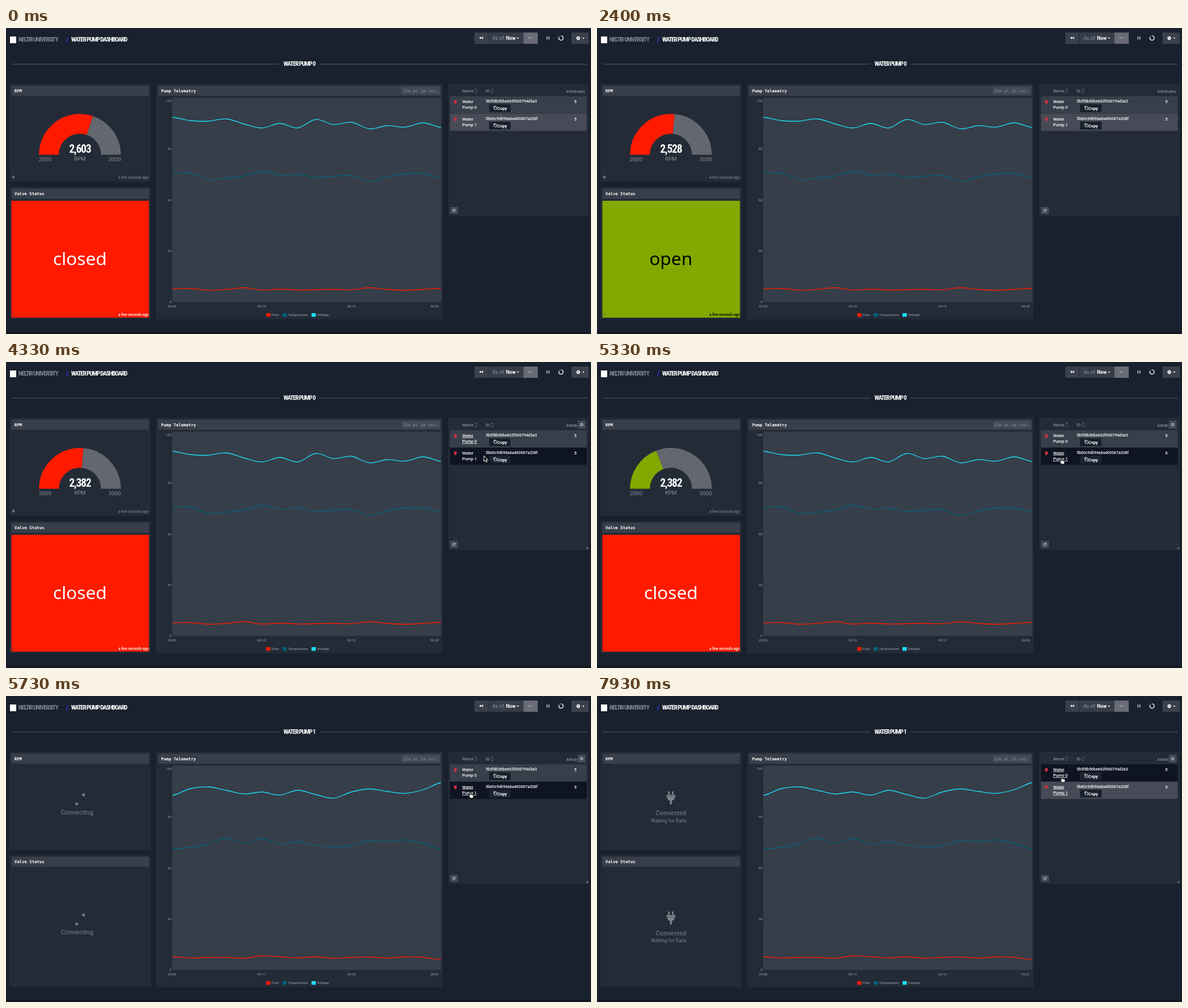
An HTML page with a canvas for the animation above (8000 ms loop, 1033 by 542 pixels).

```html
<!DOCTYPE html>
<html lang="en">
<head>
<meta charset="utf-8">
<title>Water pump dashboard</title>
<style>
  html, body { margin: 0; width: 100%; height: 100%; overflow: hidden; background: #19212e; }
  canvas { display: block; }
</style>
</head>
<body>
<canvas id="stage" width="1033" height="542"></canvas>
<script>
const ctx = document.getElementById('stage').getContext('2d');
const LOOP = 8000;
const SANS = 'Roboto, "Open Sans", sans-serif';
const TITLE = '"Roboto Condensed", Roboto, sans-serif';
const MONO = '"DejaVu Sans Mono", monospace';
const RED = '#ff1a00', GREEN = '#82a900', TEAL = '#056079', CYAN = '#1cdcf8';
const PANEL = '#232b37', HEADER = '#383f4a', GREY = '#8b9098';

// Moments at which the state changes
const FIRST_UPDATE = 1130, SECOND_UPDATE = 4330, CLICK = 5330, SWITCH = 5730, CONNECTED = 6600;

// Sixteen samples per series, as heights on the plot
const SERIES = [
  [[CYAN, [158, 164, 165, 161, 170, 177, 169, 177, 162, 171, 167, 178.5, 173, 175.5, 168, 176]],
   [TEAL, [257, 257, 268, 266, 262, 254, 260.5, 259, 264.5, 262.5, 261.5, 272, 263.5, 258.5, 258, 265]],
   [RED, [462, 461.5, 464.5, 463, 460, 464, 462.5, 464, 463.5, 463, 463.5, 460, 463, 464.5, 463, 461]]],
  [[CYAN, [176, 164, 161, 167, 173.5, 170, 175.5, 167, 174.5, 181, 170, 164.5, 169, 172.5, 166, 153.5]],
   [TEAL, [271, 268, 262, 251.5, 261, 252.5, 262, 258, 264, 267.5, 265, 256.5, 258, 255, 261, 271]],
   [RED, [462, 464, 463, 463, 464.5, 460.5, 462, 464, 462, 464.5, 463, 462.5, 464, 462, 463, 467]]]
];

// Pointer path: time, x, y
const PATH = [[3330, 948, 30], [3600, 931, 44], [3950, 882, 118], [4330, 844, 166],
              [4800, 820, 170], [6200, 820, 170], [6750, 821, 142], [8000, 821, 142]];

const ARROW = new Path2D('M0 0V10L2.3 8L3.9 11.6L5.6 10.9L4 7.4H7Z');
const HAND = new Path2D('M-1 1Q0-.7 1 1V4.5L5 5.4Q6 5.8 5.8 7L5 11H0L-3 7Q-3.6 5.6-2.3 5.9L-1 7Z');
const GRAB = new Path2D('M-2.5 3L-4.6.6Q-5.2-.9-3.7-.6L-2.6.3L-3.2-2.8Q-2.6-4.2-1.6-3L-1.2-4Q-.3-5 .4-3.8Q1.5-4.6 2-3Q3.2-3.6 3.6-2.2L3.3 3L2.5 5H-1.5Z');

const clamp = v => Math.max(0, Math.min(1, v));
const easeOut = v => 1 - (1 - clamp(v)) ** 3;
const mix = (a, b, k) => a + (b - a) * k;

function rect(x1, y1, x2, y2, color) {
  ctx.fillStyle = color;
  ctx.fillRect(x1, y1, x2 - x1, y2 - y1);
}

function poly(color, ...p) {
  ctx.fillStyle = color;
  ctx.beginPath();
  for (let i = 0; i < p.length; i += 2) ctx.lineTo(p[i], p[i + 1]);
  ctx.fill();
}

// y is the middle of the capitals
function text(str, x, y, size, color, { align = 'left', weight = 400, family = SANS, spacing = 0, underline } = {}) {
  ctx.font = `${weight} ${size}px ${family}`;
  ctx.letterSpacing = spacing + 'px';
  ctx.textAlign = align;
  ctx.fillStyle = color;
  ctx.fillText(str, x, y + size * 0.36);
  if (underline) ctx.fillRect(x, y + size * 0.36 + 1, ctx.measureText(str).width, 0.8);
}

const title = (str, x, y, color, size = 11, align = 'left') =>
  text(str, x, y, size, color, { align, weight: 700, family: TITLE, spacing: -1.1 });

function gear(x, y, r, color) {
  ctx.strokeStyle = color;
  ctx.lineWidth = r * 0.55;
  ctx.beginPath();
  ctx.arc(x, y, r * 0.62, 0, 7);
  ctx.stroke();
  for (let i = 0; i < 8; i++) {
    const a = i * Math.PI / 4, c = Math.cos(a), s = Math.sin(a);
    ctx.beginPath();
    ctx.moveTo(x + c * r * 0.7, y + s * r * 0.7);
    ctx.lineTo(x + c * r * 1.1, y + s * r * 1.1);
    ctx.stroke();
  }
}

function plug(x, y, scale, color) {
  ctx.save();
  ctx.translate(x, y);
  ctx.scale(scale, scale);
  rect(-4.8, -12, -2, -6, color);
  rect(2, -12, 4.8, -6, color);
  rect(-8, -5.5, 8, -2.5, color);
  ctx.beginPath();
  ctx.arc(0, -2, 6.8, 0, Math.PI);
  ctx.fill();
  rect(-1.6, 4, 1.6, 11, color);
  ctx.restore();
}

function handle(x, y) {
  rect(x - 4, y - 1, x, y, GREY);
  rect(x - 1, y - 4, x, y, GREY);
}

function gearBox(x, y) {
  rect(x - 7, y - 7, x + 7, y + 7, '#434a56');
  gear(x, y, 2.8, '#9da1a8');
}

function panel(x1, y1, x2, y2, name) {
  rect(x1, y1, x2, y2, PANEL);
  if (!name) return;
  rect(x1 + 3.5, 102, x2 - 3, 120, HEADER);
}

function widget(x1, y1, x2, y2, name) {
  rect(x1, y1, x2, y2, PANEL);
  rect(x1 + 3.5, y1 + 3, x2 - 3, y1 + 21, HEADER);
  text(name, x1 + 9, y1 + 12, 7.3, '#fff', { weight: 700, family: MONO });
}

function toolbar() {
  rect(7, 15, 18, 27, '#fff');
  title('NELTIR UNIVERSITY', 22, 20.5, '#80858f');
  title('/', 106, 20.5, '#2b3cf0', 13);
  title('WATER PUMP DASHBOARD', 115, 20.5, '#fff');

  rect(827, 8, 851, 28, '#3a414c');
  rect(851.5, 8, 913, 28, '#363d48');
  rect(913.5, 8, 939, 28, '#696b77');
  rect(998.5, 8, 1029, 28, '#3a414c');
  for (const x of [835.5, 839]) poly('#fff', x, 17.5, x + 3.3, 15.2, x + 3.3, 19.8);
  for (const x of [923, 926.5]) poly('#9496a0', x, 15.2, x + 3.3, 17.5, x, 19.8);
  text('As of:', 859, 17.5, 8.5, '#959aa2');
  text('Now', 883, 17.5, 8.5, '#fff', { weight: 700 });
  poly('#fff', 902, 17, 906, 17, 904, 19.3);
  rect(954.3, 15, 956.2, 20.5, '#a2a6ad');
  rect(957.7, 15, 959.6, 20.5, '#a2a6ad');
  ctx.lineWidth = 1.3;
  for (const [color, from, to] of [['#555c67', 0, 7], ['#fff', -1.5, 3.6]]) {
    ctx.strokeStyle = color;
    ctx.beginPath();
    ctx.arc(980, 17.7, 3.9, from, to);
    ctx.stroke();
  }
  gear(1010.5, 18, 3, '#fff');
  poly('#fff', 1017.5, 17, 1021.5, 17, 1019.5, 19.3);
}

function heading(pump, hover) {
  if (hover) {
    rect(6, 38, 1029, 55.5, '#363d48');
    gearBox(1020, 47);
    handle(1028, 88.5);
  }
  rect(10, 63.5, 482, 64.5, '#555c66');
  rect(554, 63.5, 1026, 64.5, '#555c66');
  title('WATER PUMP ' + pump, 518, 63.5, '#fff', 11, 'center');
}

function gaugeWidget(t) {
  const value = t < FIRST_UPDATE ? '2,603' : t < SECOND_UPDATE ? '2,528' : '2,382';
  let level = mix(0.603, 0.528, easeOut((t - FIRST_UPDATE) / 800));
  level = mix(level, 0.382, easeOut((t - SECOND_UPDATE) / 800));
  const split = Math.PI * (1 + level);
  ctx.lineWidth = 35;
  for (const [color, from, to] of [['#64676f', split, Math.PI * 2], [level < 0.5 ? GREEN : RED, Math.PI, split]]) {
    ctx.strokeStyle = color;
    ctx.beginPath();
    ctx.arc(130.5, 224.5, 54.7, from, to);
    ctx.stroke();
  }
  text(value, 130.5, 214, 19.5, '#fff', { align: 'center', weight: 700, family: TITLE, spacing: -1.2 });
  text('RPM', 130.5, 232, 9.6, GREY, { align: 'center' });
  text('2000', 58, 232, 9.9, GREY);
  text('3000', 203, 232, 9.9, GREY, { align: 'right' });
  if (t < CLICK) plug(13, 264.5, 0.28, GREY);
  text('a few seconds ago', 252, 264.5, 6.4, GREY, { align: 'right' });
}

function valveWidget(t) {
  const open = t >= FIRST_UPDATE && t < SECOND_UPDATE;
  const ink = open ? '#000' : '#fff';
  rect(9.5, 306, 252.5, 513, open ? GREEN : RED);
  text(open ? 'open' : 'closed', 130.5, 409, 31.7, ink, { align: 'center', family: '"Noto Sans", sans-serif' });
  if (t < CLICK) plug(13, 507.5, 0.28, open ? '#6d901c' : '#a33a2c');
  text('a few seconds ago', 252, 507.5, 6.4, ink, { align: 'right', weight: 500 });
}

// Two cubes wander around a square, shrinking and growing between its corners
function loader(cx, cy, t) {
  for (const shift of [0.22, 0.72]) {
    const e = ((t - SWITCH) / 1800 + shift) % 1 * 4, side = Math.floor(e), k = e - side;
    const half = side % 2 ? mix(2, 4, k) : mix(4, 2, k);
    ctx.save();
    ctx.translate(cx, cy);
    ctx.rotate(side * Math.PI / 2);
    ctx.translate(mix(-8, 8, k), -8);
    ctx.rotate(-e * Math.PI);
    rect(-half, -half, half, half, '#797e87');
    ctx.restore();
  }
}

function waiting(cy, t) {
  const dots = '.'.repeat(Math.floor((t - SWITCH) / 400) % 4);
  if (t < CONNECTED) {
    loader(131, cy, t);
    text('Connecting ' + dots, 97, cy + 22.5, 11.3, '#7e838c');
  } else {
    plug(130.5, cy - 2, 1, '#7e838c');
    text('Connected', 130.5, cy + 24, 11.3, '#7e838c', { align: 'center' });
    text('Waiting for Data ' + dots, 95, cy + 37.5, 8.7, '#7e838c');
  }
}

function curve(points, color) {
  const step = 474 / 15, at = i => points[Math.max(0, Math.min(15, i))];
  ctx.strokeStyle = color;
  ctx.lineWidth = 1.3;
  ctx.beginPath();
  ctx.moveTo(294, at(0));
  for (let i = 0; i < 15; i++) {
    const x = 294 + i * step;
    ctx.bezierCurveTo(x + step / 3, at(i) + (at(i + 1) - at(i - 1)) / 6,
      x + step * 2 / 3, at(i + 1) - (at(i + 2) - at(i)) / 6, x + step, at(i + 1));
  }
  ctx.stroke();
}

function chart(pump) {
  widget(265, 99, 771, 516, 'Pump Telemetry');
  rect(699, 104.5, 766, 117.5, '#444b56');
  text('15m at 1m res.', 701, 111, 7.3, '#858a92', { family: MONO });
  rect(293.5, 123.5, 768.5, 485, '#363e49');
  [129, 214, 304.5, 394.5, 485].forEach((y, i) =>
    text(String(120 - i * 30), 292, y, 6, '#a4a8ae', { align: 'right' }));
  [293.5, 451.5, 610, 757].forEach((x, i) =>
    text('09:' + String(5 + i * 5 + pump).padStart(2, '0'), x, 492.5, 6, '#a4a8ae', { align: 'center' }));
  for (const [color, points] of SERIES[pump]) curve(points, color);
  for (const [x, name, color] of [[459.5, 'Flow', RED], [488.5, 'Temperature', TEAL], [539.5, 'Voltage', CYAN]]) {
    rect(x, 505, x + 7.5, 511.5, color);
    text(name, x + 9.5, 508, 6.2, '#a4a8ae');
  }
}

function sortMark(x) {
  ctx.strokeStyle = '#878c95';
  ctx.lineWidth = 0.8;
  ctx.beginPath();
  for (const d of [-1, 1]) {
    ctx.moveTo(x - 2.2, 111.3 + d);
    ctx.lineTo(x, 111.3 + d * 3.6);
    ctx.lineTo(x + 2.2, 111.3 + d);
  }
  ctx.stroke();
}

function tableRow(i, id, hovered, underline) {
  const y = 130 + i * 30.8, white = { weight: 500 };
  rect(784, y - 9, 1025.5, y + 21.5, hovered ? '#0e1422' : ['#373f4a', '#484b57'][i]);
  ctx.fillStyle = '#d3303c';
  ctx.beginPath();
  ctx.ellipse(793.5, y + 1, 2.3, 3.3, 0, 0, 7);
  ctx.fill();
  rect(791, y - 2.5, 792, y - 1, '#d3303c');
  rect(795, y - 2.5, 796, y - 1, '#d3303c');
  text('Water', 805.5, y, 7.5, '#fff', { ...white, underline });
  text('Pump ' + i, 805.5, y + 10.5, 7.5, '#fff', { ...white, underline });
  text(id, 847, y, 6.9, '#fff', white);
  text('5', 1005.5, y, 7.5, '#fff', { ...white, align: 'center' });
  rect(853, y + 5, 891, y + 19, hovered ? '#1c2432' : '#18202c');
  ctx.strokeStyle = '#e4e6e8';
  ctx.lineWidth = 0.8;
  ctx.strokeRect(862.8, y + 9.7, 3.7, 4.6);
  ctx.beginPath();
  ctx.moveTo(865, y + 8.4);
  ctx.lineTo(861.2, y + 8.4);
  ctx.lineTo(861.2, y + 13);
  ctx.stroke();
  text('Copy', 867.5, y + 12, 7.5, '#fff', { weight: 600 });
}

function table(t, p) {
  rect(781, 99, 1029, 333, PANEL);
  text('Name', 805.5, 111.5, 7.5, '#a0a4ab');
  sortMark(829.5);
  text('ID', 847, 111.5, 7.5, '#a0a4ab');
  sortMark(858.5);
  text('Attributes', 1022.5, 112, 7.6, '#a0a4ab', { align: 'right' });
  const inside = p && p.x > 781 && p.y >= 99;
  const focus = t < PATH[0][0] ? -1 : t < CLICK ? 0 : 1;
  const row = inside && p.y >= 121 ? (p.y < 152 ? 0 : 1) : -1;
  ['5b5f8b56be662f000794d3a3', '5b60c9d096a6a400067a208f'].forEach((id, i) =>
    tableRow(i, id, row === i, focus === i || (row === i && overLink(p))));
  rect(784, 317, 798, 329.5, '#434a55');
  ctx.strokeStyle = '#e4e6e8';
  ctx.lineWidth = 1;
  ctx.beginPath();
  ctx.arc(791, 323.3, 2.2, 0.3, 5.6);
  ctx.stroke();
  poly('#e4e6e8', 793.8, 320.6, 793.8, 323, 791.6, 323);
  if (inside) {
    rect(1009.5, 103, 1025, 119, PANEL);
    gearBox(1016.5, 111);
    handle(1028, 331);
  }
}

const overLink = p => p.x > 803 && p.x < 833;

function pointerAt(t) {
  const i = PATH.findIndex(k => k[0] > t);
  if (i < 1) return null;
  const [t0, x0, y0] = PATH[i - 1], [t1, x1, y1] = PATH[i];
  const k = (t - t0) / (t1 - t0), s = k * k * (3 - 2 * k);
  return { x: mix(x0, x1, s), y: mix(y0, y1, s) };
}

function pointer(p, bar) {
  const link = p.y > 121 && overLink(p);
  const shape = bar ? GRAB : link ? HAND : ARROW;
  ctx.save();
  ctx.translate(p.x, p.y);
  ctx.lineJoin = 'round';
  ctx.lineWidth = 1;
  ctx.fillStyle = shape === ARROW ? '#000' : '#fff';
  ctx.strokeStyle = shape === ARROW ? '#fff' : '#000';
  ctx.fill(shape);
  ctx.stroke(shape);
  ctx.restore();
}

function draw(t) {
  const p = pointerAt(t), pump = t < SWITCH ? 0 : 1;
  const bar = p && p.y >= 36 && p.y < 95;
  rect(0, 0, 1033, 542, '#19212e');
  rect(0, 538, 1033, 542, '#121822');
  toolbar();
  heading(pump, bar);
  widget(6, 99, 255.5, 272.5, 'RPM');
  widget(6, 281.5, 255.5, 515.5, 'Valve Status');
  if (pump) {
    waiting(183, t);
    waiting(395.7, t);
  } else {
    gaugeWidget(t);
    valveWidget(t);
  }
  chart(pump);
  table(t, p);
  if (p) pointer(p, bar);
}

function frame() {
  draw(performance.now() % LOOP);
  requestAnimationFrame(frame);
}
frame();
</script>
</body>
</html>
```
